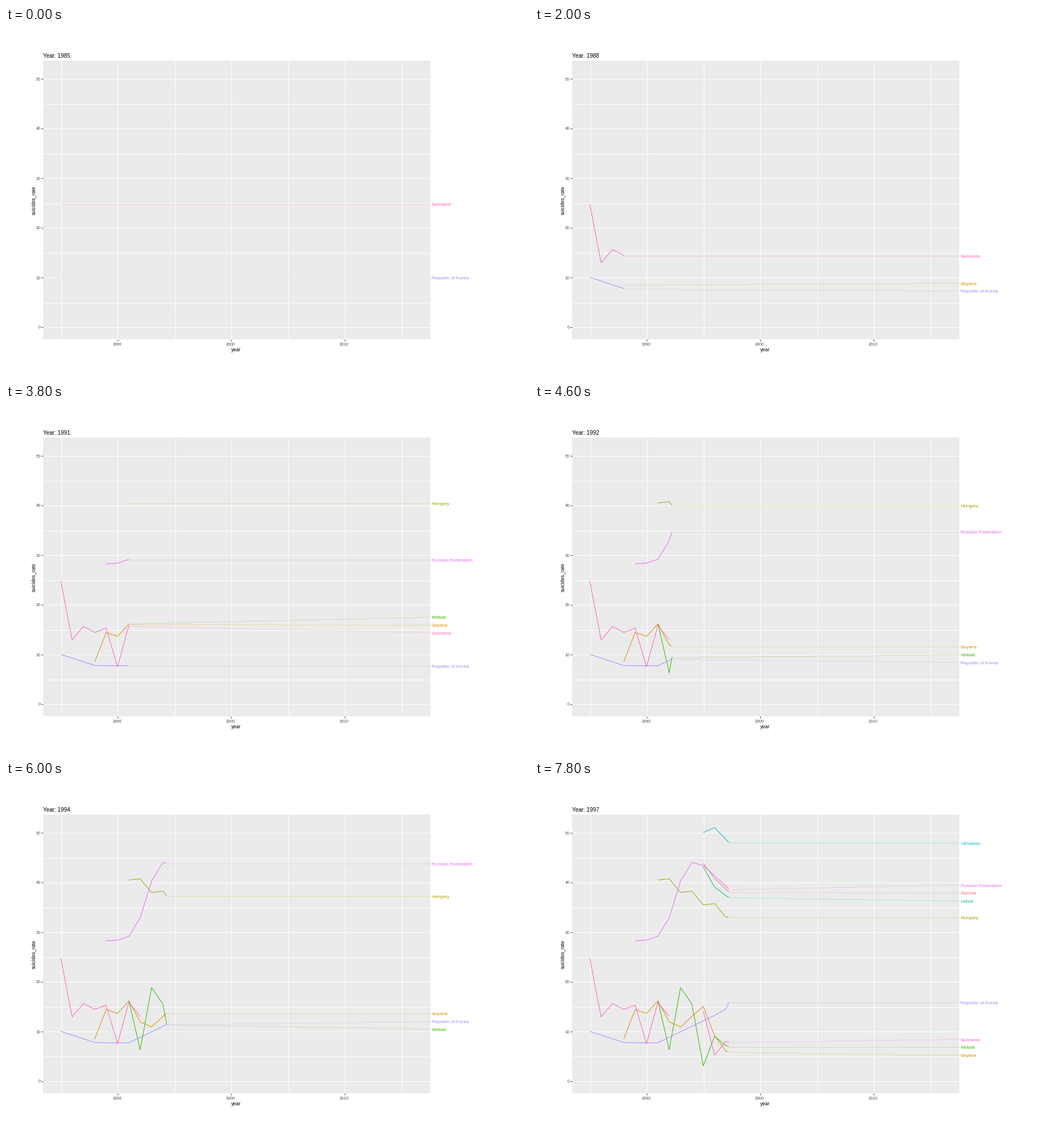
Recreate the animation shown at these times as a matplotlib script. Size 917x611 px, loop 8 s.

```python
import matplotlib.pyplot as plt
import numpy as np
from matplotlib.animation import FuncAnimation
from matplotlib.patches import Rectangle

W, H, DPI = 917, 611, 64
PT = 72 / DPI                       # points per pixel
FRAMES, INTERVAL = 40, 200
LEFT, RIGHT, TOP, BOTTOM = 65, 744, 57, 545
FIRST, LAST = 1985, 1998
GAP = 13.8                          # least distance between two labels

plt.rcParams["font.family"] = "Liberation Sans"


def yearly(start, rule):
    return rule(np.arange(LAST - start + 1))


def korea(t):
    trend = np.maximum(np.maximum(10 - 0.75 * t, 7.7), 1.1 + 1.1 * t)
    return trend + 4.4 * np.exp(3 * (t - 13))


def russia(t):
    rise = 28.2 + 16.7 / (1 + np.exp(-1.9 * (t - 3.5)))
    return np.minimum(rise, 56 - 2.1 * t)


# name, colour, first year, yearly rates
SERIES = [
    ("Estonia", "#F8766D", 1995, yearly(1995, lambda t: 43.8 - 3 * t**0.8)),
    ("Guyana", "#D89000", 1988,
     [8.5, 14.4, 13.6, 16.1, 11.9, 10.9, 13, 15, 9.1, 6, 5.4]),
    ("Hungary", "#A3A500", 1991,
     yearly(1991, lambda t: 41.2 - 1.25 * t - 0.75 * np.cos(np.pi * t))),
    ("Kiribati", "#39B600", 1991, [16.2, 6.3, 18.8, 15.5, 3, 9, 7.1, 6.5]),
    ("Latvia", "#00BF7D", 1995, yearly(1995, lambda t: 43.1 - 4.1 * t**0.5)),
    ("Lithuania", "#00BFC4", 1995,
     yearly(1995, lambda t: np.minimum(50 + t, 53.4 - 2.4 * t))),
    ("Republic of Korea", "#9590FF", 1985, yearly(1985, korea)),
    ("Russian Federation", "#E76BF3", 1989, yearly(1989, russia)),
    ("Suriname", "#FF62BC", 1985,
     [24.8, 12.9, 15.6, 14.4, 15.3, 7.5, 15.8, 13]),
    ("Suriname", "#FF62BC", 1995, [14.1, 5.2, 8, 7.2]),
]

# Each year is reached on a whole frame; values are linear in between.
YEARS = np.arange(FIRST, LAST + 1)
KNOTS = np.round((YEARS - FIRST) * 99 / 31)


def px(year):
    return 96 + (year - FIRST) * 19.9


def py(rate):
    return 523.5 - 8.7 * np.asarray(rate)


def spread(ys):
    """Push sorted positions apart, keeping the centre of each cluster."""
    blocks = []
    for y in ys:
        blocks.append([y, 1])
        while len(blocks) > 1:
            (c0, n0), (c1, n1) = blocks[-2:]
            if c1 - c0 >= GAP * (n0 + n1) / 2:
                break
            blocks[-2:] = [[(c0 * n0 + c1 * n1) / (n0 + n1), n0 + n1]]
    return [c + GAP * (i - (n - 1) / 2) for c, n in blocks for i in range(n)]


def stairs(x0, y0, x1, y1):
    """Points of a shallow line drawn in whole pixel rows."""
    r0, r1 = int(y0), int(y1)
    n = max(abs(r1 - r0) + 1, 2)
    return np.linspace(x0, x1, n), np.linspace(r0, r1, n) + 0.5


fig = plt.figure(figsize=(W / DPI, H / DPI), dpi=DPI, facecolor="white")
ax = fig.add_axes([0, 0, 1, 1])
ax.set_xlim(0, W)
ax.set_ylim(H, 0)
ax.axis("off")


def line(xs, ys, color, **kw):
    return ax.plot(xs, ys, color=color, lw=PT, solid_capstyle="butt", **kw)[0]


def label(x, y, s, size, color="black", **kw):
    return ax.text(x, y, s, fontsize=size * PT, color=color, va="baseline",
                   **kw)


ax.add_patch(Rectangle((LEFT, TOP), RIGHT - LEFT, BOTTOM - TOP, lw=0,
                       facecolor="#EBEBEB"))
for rate in range(0, 51, 5):
    y = int(py(rate)) + 0.5
    line([LEFT, RIGHT], [y, y], "white", zorder=1.5)
    if rate % 10 == 0:
        line([LEFT - 3, LEFT], [y, y], "#333333")
        label(61, y + 3, str(rate), 7.2, "#4D4D4D", ha="right")
for year in range(1985, 2016, 5):
    x = int(px(year)) + 0.5
    line([x, x], [TOP, BOTTOM], "white", zorder=1.5)
    if year % 10 == 0:
        line([x, x], [BOTTOM, BOTTOM + 3], "#333333")
        label(x - 0.5, 556, str(year), 7.2, "#4D4D4D", ha="center")
label(404, 566.5, "year", 8.7, ha="center")
label(50.5, 301.5, "suicides_rate", 8.5, ha="center", rotation=90,
      rotation_mode="anchor")
title = label(65, 52, "", 9.9)

paths = [line([], [], color, zorder=3) for _, color, _, _ in SERIES]
leaders = [line([], [], color, alpha=0.22, zorder=4, drawstyle="steps-mid")
           for _, color, _, _ in SERIES]
names = [label(746, 0, name, 8.2, color) for name, color, _, _ in SERIES]


def draw(k):
    now = np.interp(k, KNOTS, YEARS)
    title.set_text(f"Year: {round(FIRST + k * 31 / 99)}")
    live = []
    for i, (_, _, start, rates) in enumerate(SERIES):
        years = start + np.arange(len(rates))
        past = years <= now
        xs, ys = px(years[past]), py(rates)[past]
        active = start <= now <= years[-1]
        if active:
            tip = float(py(np.interp(now, years, rates)))
            xs, ys = np.append(xs, px(now)), np.append(ys, tip)
            live.append((tip, i))
        paths[i].set_data(xs, ys)
        leaders[i].set_visible(active)
        names[i].set_visible(active)

    live.sort()
    for (tip, i), y in zip(live, spread([tip for tip, _ in live])):
        leaders[i].set_data(*stairs(px(now), tip, RIGHT, y))
        names[i].set_position((746, y + 3.7))
    return [title, *paths, *leaders, *names]


anim = FuncAnimation(fig, draw, frames=FRAMES, init_func=lambda: draw(0),
                     interval=INTERVAL, repeat=True, repeat_delay=0,
                     blit=False)
plt.show()
```
